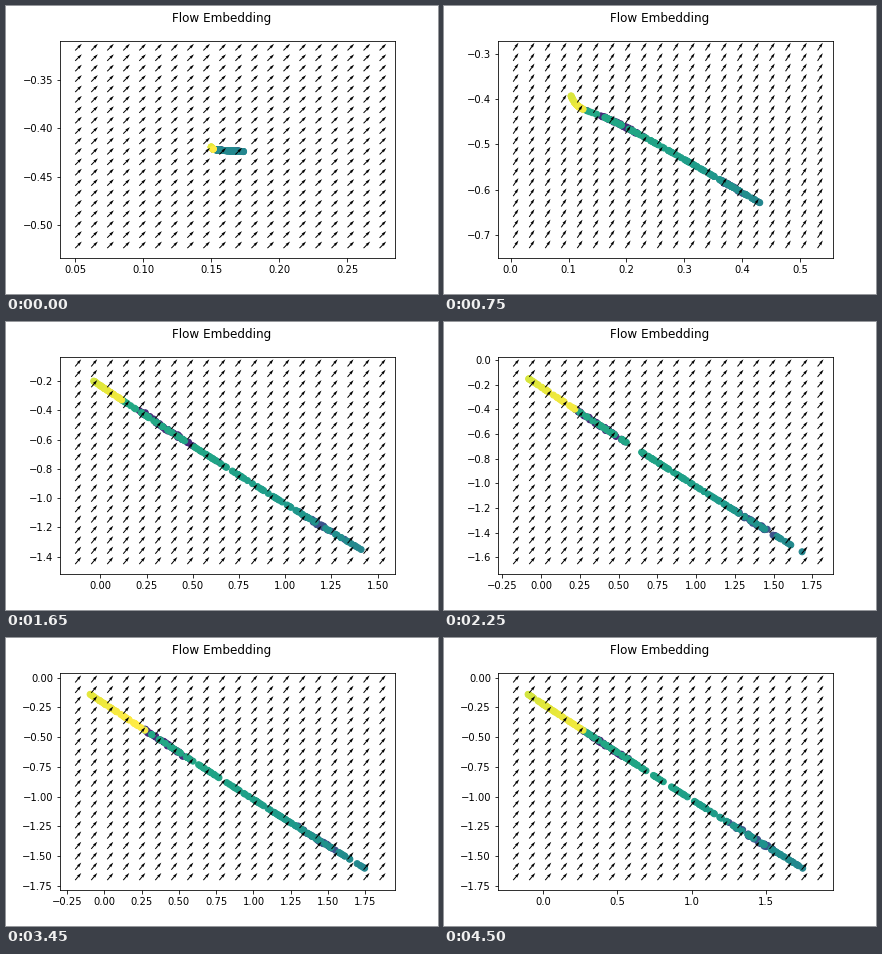
Recreate the animation shown at these times as a matplotlib script. Size 432 px wide and 288 px high, loop 4.65 s.

```python
import numpy as np
import matplotlib.pyplot as plt
from matplotlib.animation import FuncAnimation

STEP_MS = 150
SLOTS = 31
viridis = plt.get_cmap("viridis")


def sigmoid(t, mid, width):
    return 1 / (1 + np.exp((mid - t) / width))


def growth(t):
    """S-curve from 0 at the first step towards 1."""
    low = sigmoid(0, 7.1, 2.15)
    return (sigmoid(t, 7.1, 2.15) - low) / (1 - low)


def pulse(t):
    """Short early swing that peaks at step 2."""
    return (t / 2 * np.exp(1 - t / 2)) ** 2


def bounds(t):
    """Left, right, top and bottom of the embedded points."""
    start = np.array([.150, .1738, -.4192, -.4239])
    end = np.array([-.08 - .0007 * t, 1.747, -.141, -1.602])
    swing = np.array([-.015, .005, -.035, -.026])
    return start + (end - start) * growth(t) + swing * pulse(t)


def depth(u, t):
    """Relative depth of the curve at the fraction u of its width."""
    rise = 1 - np.exp(-u / .05)
    bow = .04 + .12 * (1 - growth(t)) - .3 * pulse(t)
    hook = .55 * np.exp(-2 * t) * (1 - u) + .3 * pulse(t) * np.exp(-u / .1)
    return u + bow * u * (1 - u) + hook * rise


fig = plt.figure(figsize=(6, 4), dpi=72, facecolor="white")
ax = fig.add_axes([.125, .125, .775, .755])
fig.suptitle("Flow Embedding", fontsize=12, y=.98)


def draw(slot):
    t = max(0, slot - 1)
    rng = np.random.RandomState(t + 40)
    left, right, top, bottom = bounds(t)

    def dots(u, color, jitter=0):
        v = depth(u, t) + rng.normal(0, 1, u.size) * jitter
        ax.scatter(left + (right - left) * u, top + (bottom - top) * v, c=color)

    def spread(count):
        return np.append(rng.uniform(0, 1, count), [0, 1])

    ax.clear()
    share = .06 + .14 * sigmoid(t, 11.5, 2)

    # two dark clusters, mostly hidden below the teal dots
    dark = np.append(rng.normal(.27, .06, 45), rng.normal(.83, .04, 30))
    dark = dark[(dark > share) & (dark < .96)]
    dots(dark, viridis(np.where(dark > .6, .25, .12)), .004)

    teal = share + (1 - share) * spread(120)
    hue = .60 - .13 * np.exp(-t)
    dots(teal, viridis(hue + (.46 - hue) * teal ** 2.5))

    s = spread(45)
    yellow = viridis(rng.uniform(.94, 1) - .05 * (1 - s) ** 2)
    yellow[:, :3] = 1 - .85 * (1 - yellow[:, :3])
    dots(share * s, yellow)

    gx, gy = np.meshgrid(np.linspace(left - .1, right + .1, 20),
                         np.linspace(bottom - .1, top + .1, 20))
    angle = np.radians(50 - 5 * np.exp(-t / 2) + 12 * pulse(t))
    ax.quiver(gx, gy, np.full(gx.shape, np.cos(angle)),
              np.full(gx.shape, np.sin(angle)))
    return []


anim = FuncAnimation(fig, draw, frames=SLOTS, init_func=lambda: draw(0),
                     interval=STEP_MS, repeat=True, repeat_delay=0, blit=False)
plt.show()
```
